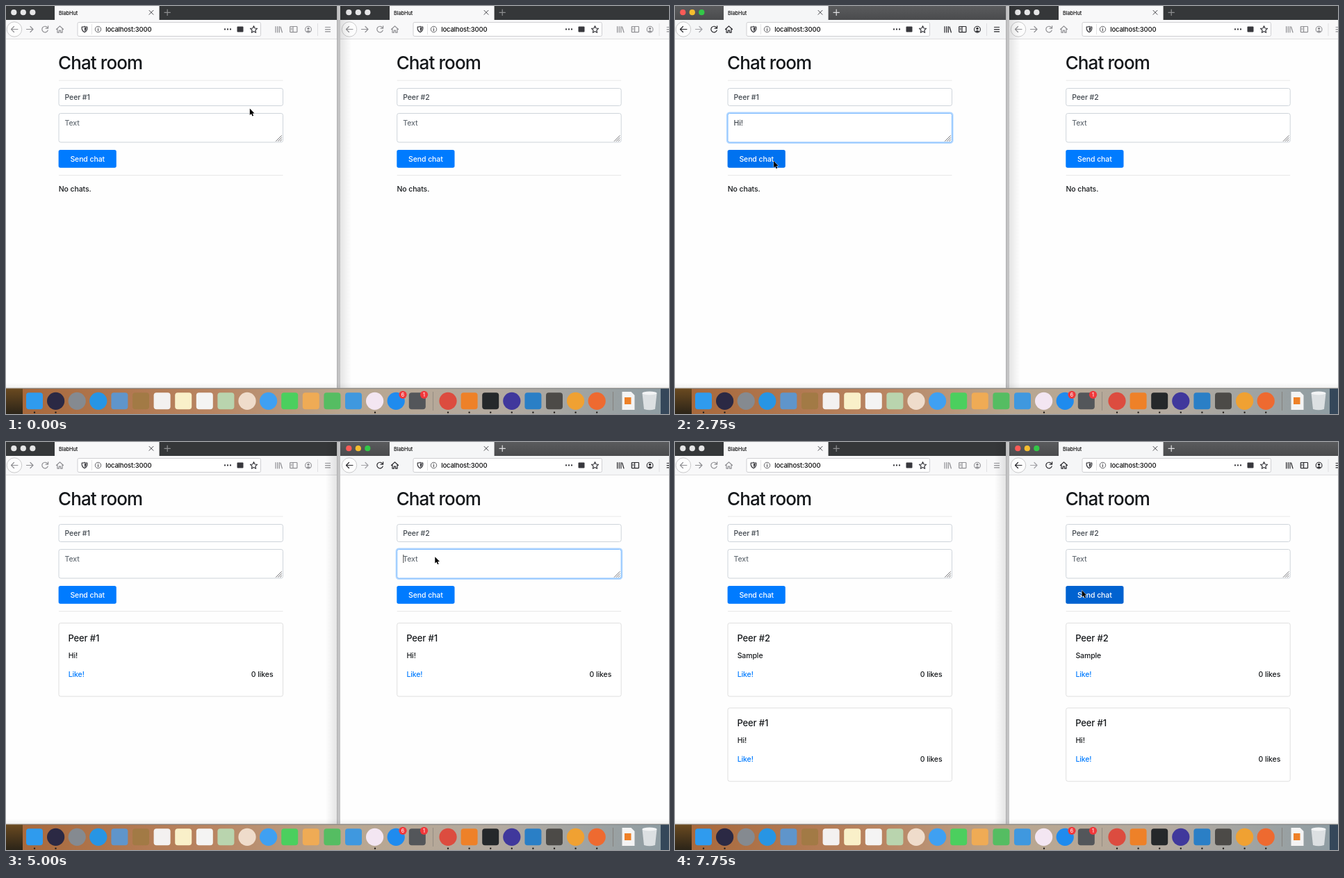
An HTML page for the animation above (8 s loop, 954x587 px).

```html
<!DOCTYPE html>
<html lang="en">
<head>
<meta charset="utf-8">
<title>Chat room</title>
<style>
  html, body { margin: 0; width: 100%; height: 100%; overflow: hidden; background: #fff; }
  svg { display: block; position: fixed; left: 0; top: 0; }
  text { font: 450 10.5px Inter, "Open Sans", sans-serif; letter-spacing: -.1px; font-optical-sizing: none; fill: #15181b; white-space: pre; }
  .heading { font-size: 26px; font-weight: 550; letter-spacing: -.9px; }
  .name { font-size: 13px; font-weight: 550; letter-spacing: -.15px; }
  .tab { font-size: 7.4px; fill: #0c0c0d; }
  .url { font-size: 9.5px; letter-spacing: -.17px; fill: #0c0c0d; }
  .badge { font-size: 7px; fill: #fff; }
  .value { fill: #40474e; }
  .hint { fill: #656d75; }
  .link { fill: #007bff; }
  .label { fill: #fff; }
  .icon { fill: none; stroke-width: 1.2; stroke-linecap: round; stroke-linejoin: round; }
</style>
</head>
<body>
<svg id="stage" width="954" height="587" viewBox="0 0 954 587"></svg>
<script>
const LOOP = 8000;
const BLUE = '#007bff';
const USERS = ['Peer #1', 'Peer #2'];
const hi = { from: USERS[0], text: 'Hi!' };
const sample = { from: USERS[1], text: 'Sample' };

// Each step overrides the state built up by the steps before it.
const steps = [
  [0, { cursor: [350.8, 147.5], active: -1, focus: -1, typed: '', caret: false, buttons: [BLUE, BLUE], chats: [] }],
  [250, { cursor: [311, 166] }],
  [500, { cursor: [276.4, 174.3], active: 0 }],
  [1500, { focus: 0 }],
  [1750, { caret: true }],
  [2250, { typed: 'Hi!', caret: false }],
  [2500, { cursor: [205, 199] }],
  [2750, { cursor: [142, 223], buttons: ['#0072f0', BLUE] }],
  [3000, { focus: -1, typed: '', buttons: ['#0062cc', BLUE], chats: [hi] }],
  [3250, { cursor: [190, 219], buttons: [BLUE, BLUE] }],
  [3500, { cursor: [360, 205] }],
  [3750, { cursor: [540, 191] }],
  [4000, { cursor: [610.5, 184] }],
  [4250, { active: 1 }],
  [4750, { cursor: [615, 170], focus: 1 }],
  [5000, { cursor: [617.3, 165.2], caret: true }],
  [5750, { typed: 'S' }],
  [6000, { typed: 'Sam' }],
  [6250, { typed: 'Sampl' }],
  [6500, { typed: 'Sample', caret: false }],
  [7000, { cursor: [602, 188] }],
  [7250, { cursor: [586, 211.5], buttons: [BLUE, '#0069e0'] }],
  [7500, { cursor: [585.6, 213.5], focus: -1, typed: '', buttons: [BLUE, '#0062d0'], chats: [sample, hi] }],
];

const rect = (x, y, w, h, fill, more = '') => `<rect x="${x}" y="${y}" width="${w}" height="${h}" fill="${fill}" ${more}/>`;
const circle = (x, y, r, fill, more = '') => `<circle cx="${x}" cy="${y}" r="${r}" fill="${fill}" ${more}/>`;
const text = (x, y, str, cls = '', anchor = 'start') => `<text x="${x}" y="${y}" class="${cls}" text-anchor="${anchor}">${str}</text>`;
const icon = (d, color, more = '') => `<path class="icon" d="${d}" stroke="${color}" ${more}/>`;
const shift = (x, y, body) => `<g transform="translate(${x} ${y})">${body}</g>`;
const box = (y, h, border = '#ced4da') => rect(76, y, 322.5, h, '#fff', `rx="2.7" stroke="${border}"`);
const rule = y => rect(76, y, 322.5, 1, '#e8e8e8');

const defs = `<defs>
  <linearGradient id="bar" x2="0" y2="1"><stop stop-color="#5a5b5d"/><stop offset="1" stop-color="#4a4b4d"/></linearGradient>
  <linearGradient id="shade"><stop stop-color="#000" stop-opacity=".1"/><stop offset="1" stop-color="#000" stop-opacity="0"/></linearGradient>
  <linearGradient id="foot" x2="0" y2="1"><stop stop-color="#000" stop-opacity="0"/><stop offset="1" stop-color="#000" stop-opacity=".06"/></linearGradient>
  <linearGradient id="dock"><stop stop-color="#a8693c"/><stop offset=".3" stop-color="#b98562"/><stop offset=".5" stop-color="#b9a68f"/><stop offset=".75" stop-color="#b3aaa0"/><stop offset="1" stop-color="#8f9da3"/></linearGradient>
  <linearGradient id="edge" x2="0" y2="1"><stop stop-color="#6b4a20"/><stop offset="1" stop-color="#2b2418"/></linearGradient>
</defs>`;

function navigation(color, faint) {
  return circle(12, 33.5, 10.7, '#fdfdfd', 'stroke="#c4c4c6" stroke-width=".9"')
    + icon('M17 33.5H7.5M11.5 29.5l-4 4 4 4', color)
    + icon('M29.5 33.5H39M35 29.5l4 4-4 4', faint)
    + icon('M59.6 31A4.3 4.3 0 1 0 60.2 35M60.6 28.8v3.4h-3.4', color)
    + icon('M72.5 33.5l5-4.6 5 4.6M74 33v5.2h2.4v-3h2.2v3H81V33', color);
}

function addressBar(x, width) {
  const dark = '#38383d';
  const dots = [52, 48, 44].map(d => circle(width - d + .5, 33.5, 1.15, dark)).join('');
  return shift(x, 0, rect(0, 23.5, width, 20, '#fff', 'rx="2" stroke="#cfcfd2"')
    + icon('M6.2 30.2q3.3 0 3.8-1 .5 1 3.8 1v2.6q-.4 3.3-3.8 4.9-3.4-1.6-3.8-4.9z', dark)
    + '<path d="M10 30.4q1.2.7 2.5.8v1.5q-.3 2.2-2.5 3.5z" fill="#38383d"/>'
    + rect(20, 26, .8, 15, '#dcdcde')
    + circle(29.5, 33.5, 4.2, 'none', 'stroke="#55555a" stroke-width=".9"')
    + icon('M29.5 33v2.6M29.5 31.2v.1', dark, 'style="stroke-width:1"')
    + text(40.2, 37.2, 'localhost:3000', 'url')
    + dots
    + rect(width - 34, 29.5, 9, 8, dark, 'rx="1"')
    + shift(width - 10, 33.7, icon('M0-5L1.5-1.7 5-1.3 2.4 1 3.1 4.6 0 2.8-3.1 4.6-2.4 1-5-1.3-1.5-1.7Z', dark)));
}

function tools(color) {
  return icon('M388 29.5v8.5M390.7 29.5v8.5M393.3 29.5v8.5M395 30l2.4 8', color)
    + icon('M409.5 29.5h8.6q.8 0 .8.8v6.6q0 .8-.8.8h-8.6q-.8 0-.8-.8v-6.6q0-.8.8-.8zM413 30v7.5M410.3 32h1M410.3 34h1', color)
    + circle(435, 33.7, 4.4, 'none', `stroke="${color}" stroke-width="1.1"`)
    + circle(435, 32.4, 1.7, color)
    + `<path d="M432 36.6q3-3 6 0-3 2-6 0z" fill="${color}"/>`
    + rect(448, 25, .8, 18, '#d9d9dc')
    + icon('M459.5 30.5h7M459.5 33.7h7M459.5 36.9h7', color);
}

function browser(i, active) {
  const on = active === i;
  const left = i * 481, width = i ? 473 : 476, offset = i * 482;
  const lights = on ? ['#fc5b57', '#f5bd2f', '#33c748'] : Array(3).fill('#e6e6e7');
  const color = on ? '#29292d' : '#8f8f93';
  const surface = on ? '#f5f6f7' : '#f8f8f9';
  return rect(left, 0, width, 550, '#fefefe')
    + rect(left, 0, width, 20, on ? 'url(#bar)' : '#353739')
    + rect(left, 20, width, 27.5, surface)
    + rect(left, 47, width, 1, '#dedee0')
    + shift(offset, 0, lights.map((c, n) => circle(11.3 + n * 13.5, 9.2, 4.1, c)).join('')
      + rect(70, 0, 150.6, 20, surface)
      + text(76, 12.5, 'BlabHut', 'tab')
      + icon('M206 6.3l6 6M212 6.3l-6 6', '#4a4a4f', 'style="stroke-width:1"')
      + icon('M228 9.3h8.4M232.2 5.1v8.4', on ? '#e0e0e2' : '#8e8f91')
      + navigation(color, on ? '#a2a2a6' : '#8f8f93'))
    + addressBar(i ? 586 : 103, i ? 271.5 : 263.5)
    + shift(i * 491.6, 0, tools(color));
}

const card = (chat, n) => shift(0, n * 122.2,
  box(260.5, 105.5, '#dfdfdf')
  + text(89.5, 287.3, chat.from, 'name')
  + text(89.7, 310.6, chat.text)
  + text(89.7, 337.5, 'Like!', 'link')
  + text(384.5, 337.5, '0 likes', '', 'end'));

function page(i, s) {
  const focused = s.focus === i;
  const typed = focused ? s.typed : '';
  const caretX = 84.7 + (typed ? typed.length * 6.1 + 1 : 0);
  return shift(i * 486.7, 0,
    text(75, 91, 'Chat room', 'heading')
    + rule(106.6)
    + box(118.5, 25) + text(84.5, 135, USERS[i], 'value')
    + (focused ? rect(75, 153.5, 324.5, 43.5, 'none', 'rx="3.6" stroke="#b3d7ff" stroke-width="2.2"') : '')
    + box(154.5, 41.5, focused ? '#80bdff' : '#ced4da')
    + text(84.5, 171.6, typed || 'Text', typed ? 'value' : 'hint')
    + (focused && s.caret ? rect(caretX, 162, .9, 12, '#333') : '')
    + icon('M388.5 194.5l8-8M391.5 194.5l5-5M394.5 194.5l2-2', '#66666a', 'style="stroke-width:.9"')
    + rect(75.6, 207, 83.2, 25.8, s.buttons[i], 'rx="2.7"')
    + text(117.2, 223.7, 'Send chat', 'label', 'middle')
    + rule(243)
    + (s.chats.length ? s.chats.map(card).join('') : text(75.7, 267, 'No chats.')));
}

// Dock entries: shape (c = circle, s = square) and colour, evenly spaced.
const apps = `s#2f9bee c#2b2944 c#858a90 c#2795e4 s#5f95cb s#a27a45 s#f3f1f0 s#f9f0c9 s#f4f4f3 s#b9d4ae
  c#efdccb c#3fa0f2 s#4bcf5e s#efab55 s#55bd62 s#3f98df c#f3e6f2 c#1f8bee s#53565a`.match(/\S+/g);
const moreApps = 'c#dc4c3f s#ee8128 s#25282a c#40389c s#2a7fc6 s#4c4a47 c#f0a132 c#ee6a30'.match(/\S+/g);

const appIcon = (x, app) => app[0] === 'c'
  ? circle(x, 568.3, 12.6, app.slice(1))
  : rect(x - 12, 556.3, 24, 24, app.slice(1), 'rx="4"');
const row = (list, start) => list.map((app, n) => appIcon(start + n * 30.6, app)).join('');
const badge = (x, n) => circle(x, 559.3, 5.6, '#f0383b') + text(x, 561.8, n, 'badge', 'middle');

const dock = rect(0, 542, 954, 8, 'url(#foot)')
  + rect(0, 550, 954, 37, '#35475a')
  + rect(0, 550, 24, 37, 'url(#edge)')
  + rect(24, 550.5, 918, 36.5, 'url(#dock)')
  + rect(0, 549.4, 954, 1, '#a9a29b')
  + row(apps, 41) + row(moreApps, 636)
  + rect(614, 555, .8, 27, '#8e857c') + rect(873, 555, .8, 27, '#7f7b77')
  + '<path d="M886.5 555h13l5 5v21h-18z" fill="#f4f4f4"/>'
  + rect(890, 563, 9.5, 10, '#ee8128')
  + '<path d="M915.5 557h21l-2.5 23q-8 2.5-16 0z" fill="#dce0e2"/><ellipse cx="926" cy="557" rx="10.5" ry="2.5" fill="#f3f4f5"/>'
  + badge(571, 6) + badge(601.5, 1)
  + [41, 71.5, 531, ...moreApps.map((_, n) => 636 + n * 30.6)].map(x => circle(x, 584.8, 1.2, '#26221f')).join('');

const pointer = ([x, y]) => shift(x, y,
  '<path d="M0 0V9.4L2.2 7.4 3.7 10.9 5.3 10.2 3.8 6.9H6.7Z" fill="#000" stroke="#fff" stroke-width=".8" paint-order="stroke"/>');

function shadow(active) {
  const right = rect(481, 0, 16, 550, 'url(#shade)');
  const left = `<g transform="translate(957 0) scale(-1 1)">${right}</g>`;
  return active === 1 ? left : right;
}

function draw(s) {
  return defs + browser(0, s.active) + browser(1, s.active)
    + rect(476, 0, 5, 550, '#c3c3c4') + rect(476, 0, .8, 550, '#aaaaac')
    + shadow(s.active) + page(0, s) + page(1, s) + dock + pointer(s.cursor);
}

const stage = document.getElementById('stage');
const start = performance.now();
let shown = -1;

function tick() {
  const time = (performance.now() - start) % LOOP;
  const count = steps.filter(([at]) => at <= time).length;
  if (count !== shown) {
    shown = count;
    stage.innerHTML = draw(Object.assign({}, ...steps.slice(0, count).map(([, change]) => change)));
  }
  requestAnimationFrame(tick);
}
tick();
</script>
</body>
</html>
```
